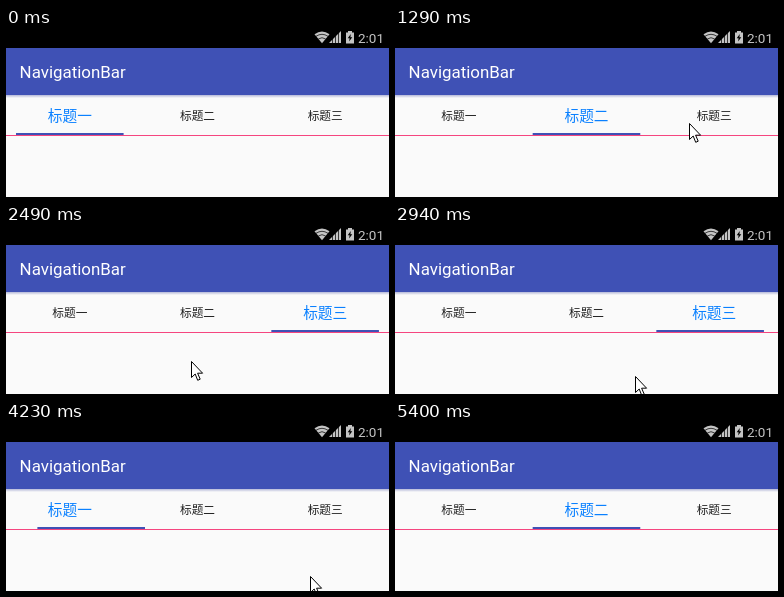
Write an HTML page that moves like this. It is 383 px wide and 169 px high and loops after 6.02 s.

```html
<!DOCTYPE html>
<html lang="zh-CN">
<head>
<meta charset="utf-8">
<title>NavigationBar</title>
<style>
  html, body { margin: 0; width: 100%; height: 100%; overflow: hidden; background: #fafafa; }
  svg { display: block; width: 100%; height: 100%; }
  text { font-family: Roboto, sans-serif; }
  .tab { font-family: "Noto Sans CJK SC", "Noto Sans CJK", sans-serif; font-size: 11.7px; fill: #222; text-anchor: middle; }
  .tab.selected { font-size: 14.7px; fill: #0a80ff; }
</style>
</head>
<body>
<svg viewBox="0 0 383 169">
  <defs>
    <linearGradient id="shadow" x2="0" y2="1">
      <stop stop-color="#b4b8d8"/>
      <stop offset="1" stop-color="#fafafa"/>
    </linearGradient>
  </defs>
  <rect width="383" height="169" fill="#fafafa"/>
  <rect width="383" height="20"/>
  <rect y="20" width="383" height="47" fill="#3f51b5"/>
  <rect y="67" width="383" height="3" fill="url(#shadow)"/>

  <g fill="#c4c4c4">
    <path d="M308.5 6.2Q316 0.8 323.5 6.2L316 15.3Z"/>
    <path d="M323 15L335 3V15Z"/>
    <path d="M340 4.5H342V3H346V4.5H348V15.5H340Z"/>
    <path d="M344.8 6L341.7 10.3H343.6L343.1 13.6L346.3 9.2H344.4Z" fill="#000"/>
    <text x="352" y="14.5" font-size="13.5">2:01</text>
  </g>
  <path d="M310 8.3Q316 4.3 322 8.3M312.3 11Q316 8.4 319.7 11M326.5 3V15M329.5 3V15M332.5 3V15"
        fill="none" stroke="#000" stroke-width=".9" opacity=".8"/>
  <text x="13.6" y="50" font-size="16.9" fill="#fff">NavigationBar</text>

  <text class="tab" x="63.8">标题一</text>
  <text class="tab" x="191.5">标题二</text>
  <text class="tab" x="319.2">标题三</text>
  <rect y="107" width="383" height="1" fill="#f5457f"/>
  <rect id="indicator" y="105" width="107.6" height="2" fill="#3f51b5"/>
  <path id="cursor" d="M.5 .5V16.5L4.2 13L6.7 19.3L9.2 18.2L6.6 12.2H11.6Z" fill="#fff" stroke="#000"/>
</svg>
<script>
const LOOP = 6020;
const STEP = 60;
const CURSOR_SHOWN = 150, CURSOR_GONE = 5400;

// Turning points of the cursor: [time, x, y]
const turns = [
  [150, 204, 158], [600, 187, 83], [780, 187, 83], [1380, 321, 98], [1860, 311, 124],
  [2040, 312, 136], [2340, 185, 136], [2460, 185, 136], [2700, 144, 150], [3180, 336, 152],
  [3780, 100, 153], [4080, 334, 154], [4530, 220, 155], [4740, 220, 155], [4860, 112, 157],
  [5340, 358, 168]
];

// A tap presses and releases at once; a swipe drags the page in between.
const gestures = [
  { press: 0, release: 0, tab: 0 },
  { press: 760, release: 760, tab: 1 },
  { press: 1420, release: 1420, tab: 2 },
  { press: 2910, release: 3120, tab: 1 },
  { press: 3840, release: 4080, tab: 0 },
  { press: 4740, release: 4860, tab: 1 }
];

const lerp = (a, b, p) => a + (b - a) * p;
const clamp = p => Math.min(1, Math.max(0, p));
const settle = p => 1 - (1 - clamp(p)) ** 5;
const tabX = tab => 10 + tab * 383 / 3;

function cursorAt(t) {
  const i = Math.max(1, turns.findIndex(([time]) => time > t));
  const last = t >= turns.at(-1)[0] ? turns.length - 1 : i;
  const [t0, x0, y0] = turns[last - 1], [t1, x1, y1] = turns[last];
  const p = clamp((t - t0) / (t1 - t0));
  return { x: lerp(x0, x1, p), y: lerp(y0, y1, p) };
}

function indicatorX(t) {
  const i = gestures.findLastIndex(gesture => gesture.press <= t);
  const { press, release, tab } = gestures[i];
  const start = tabX(gestures[Math.max(0, i - 1)].tab);
  // Three tabs span one page width, so the bar moves a third of the drag.
  const dragged = start + (cursorAt(press).x - cursorAt(Math.min(t, release)).x) / 3;
  const duration = press === release ? 210 : 600;
  return lerp(dragged, tabX(tab), settle((t - release) / duration));
}

const tabs = document.querySelectorAll(".tab");
const indicator = document.getElementById("indicator");
const cursor = document.getElementById("cursor");

function draw(now) {
  const t = Math.floor(now % LOOP / STEP) * STEP;
  const selected = gestures.findLast(gesture => gesture.release <= t).tab;
  tabs.forEach((tab, i) => {
    tab.classList.toggle("selected", i === selected);
    tab.setAttribute("y", i === selected ? 93.3 : 92.3);
  });
  indicator.setAttribute("x", indicatorX(t));
  const { x, y } = cursorAt(t);
  cursor.setAttribute("transform", `translate(${Math.round(x)} ${Math.round(y)})`);
  cursor.setAttribute("visibility", t >= CURSOR_SHOWN && t < CURSOR_GONE ? "visible" : "hidden");
}

const begin = performance.now();
function tick() {
  draw(performance.now() - begin);
  requestAnimationFrame(tick);
}
tick();
</script>
</body>
</html>
```
